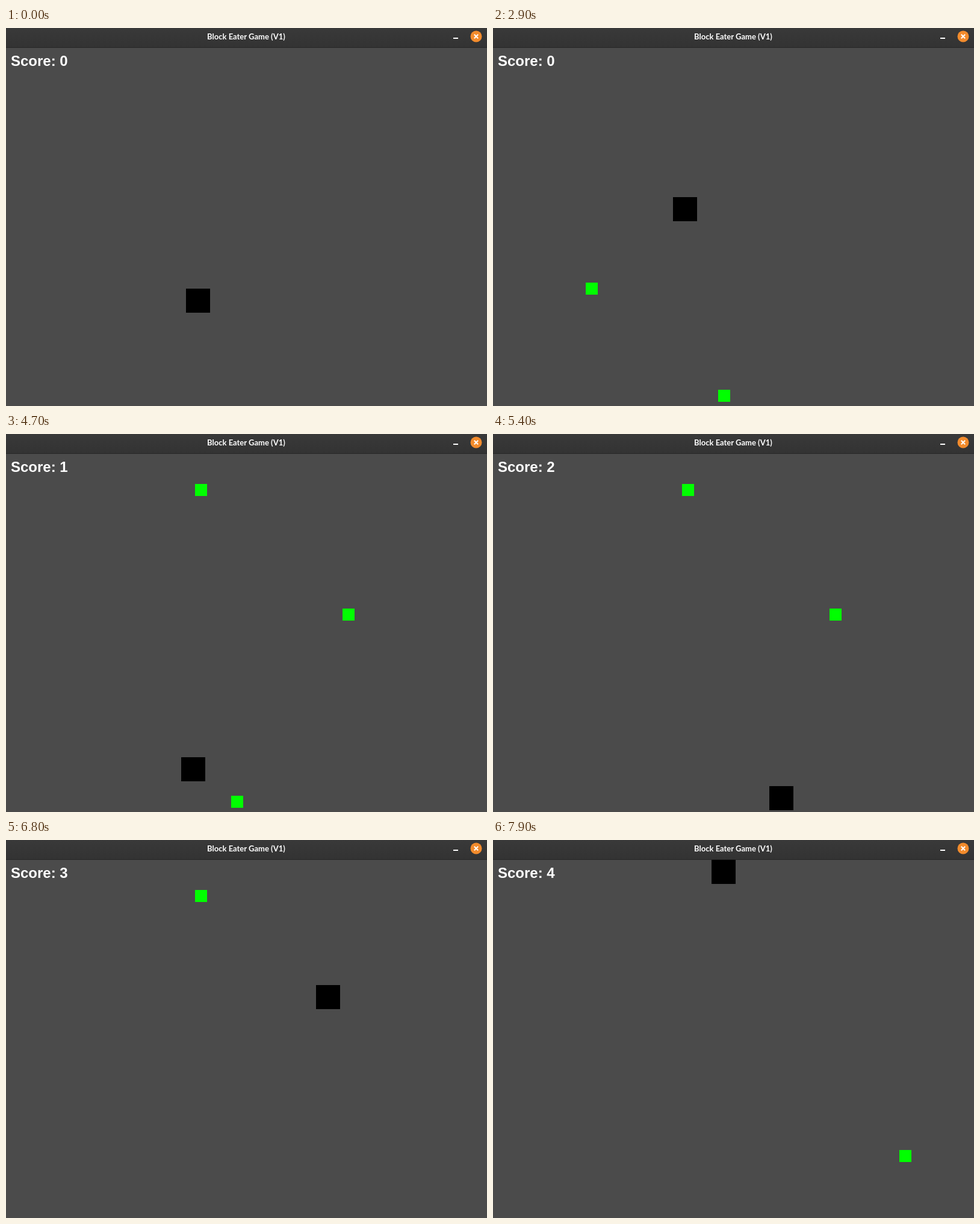
Recreate the animation shown at these times as an HTML page. Size 799 px wide and 628 px high, loop 8000 ms.

```html
<!DOCTYPE html>
<html lang="en">
<head>
<meta charset="utf-8">
<title>Block Eater Game (V1)</title>
<style>
  html, body { margin: 0; width: 100%; height: 100%; overflow: hidden; background: #4b4b4b; }
  svg { display: block; width: 799px; height: 628px; }
  .title { font: 700 13px Lato, sans-serif; text-anchor: middle; }
  .score { font: 700 24px "Liberation Sans", Arial, sans-serif; }
</style>
</head>
<body>
<svg viewBox="0 0 799 628">
  <defs>
    <linearGradient id="bar" x2="0" y2="1">
      <stop stop-color="#393939"/>
      <stop offset="1" stop-color="#333"/>
    </linearGradient>
  </defs>
  <rect width="799" height="628" fill="#4b4b4b"/>
  <g id="foods" fill="#0f0"></g>
  <rect id="player" width="40" height="40"/>
  <text id="score" class="score" x="8" y="63" fill="#fff">Score: 0</text>
  <rect width="799" height="32" fill="url(#bar)"/>
  <rect y="32" width="799" height="1" fill="#272727"/>
  <text class="title" x="399" y="19" fill="#fff">Block Eater Game (V1)</text>
  <rect x="743" y="16" width="8" height="2" fill="#fff"/>
  <circle cx="781" cy="14" r="9.5" fill="#f28b2c"/>
  <path d="M777.8 10.8l6.4 6.4m0-6.4l-6.4 6.4" stroke="#fff" stroke-width="2"/>
  <path id="pointer" d="M1 1v19l4.5-4 3 7 3.5-1.5-3-6.5h6z" stroke="#fff"/>
</svg>
<script>
const LOOP = 8000, TICK = 100, STEP = 8;
const $ = id => document.getElementById(id);

// Player path per axis: [ms, grid steps]
const pathX = [
  [3333, 0], [3600, -8], [3700, -10], [3967, -18], [4133, -18], [4700, -1],
  [5400, 20], [5540, 20], [6100, 37], [6133, 38], [6433, 38], [6800, 27],
  [7200, 15], [7667, 1], [7900, 8]
];
const pathY = [
  [300, 50], [1000, 29], [2800, 29], [2900, 31], [3333, 44], [3867, 44],
  [4500, 63], [4833, 63], [5067, 70], [5367, 70], [5400, 69], [6100, 47],
  [6300, 42], [6800, 26], [7200, 14], [7667, 0]
];
// Food: x, y, appears, eaten
const foods = [
  [154, 423, 2600, 3900],
  [374, 601, 2800, 5000],
  [559, 290, 3300, 6600],
  [314, 83, 4200, 7600],
  [675, 515, 7000, LOOP]
];
// Mouse pointer: [ms, x, y], hidden without a position
const pointer = [[0], [300, 755, 118], [400, 691, 150], [2300, 729, 54], [2400]];

function along(path, t) {
  const i = path.findIndex(p => p[0] > t);
  if (i === 0) return path[0][1];
  if (i < 0) return path[path.length - 1][1];
  const [t0, a] = path[i - 1], [t1, b] = path[i];
  return Math.round(a + (b - a) * (t - t0) / (t1 - t0));
}

function place(el, x, y) {
  el.setAttribute("transform", `translate(${x} ${y})`);
}

const show = (el, on) => el.setAttribute("visibility", on ? "visible" : "hidden");

const blocks = foods.map(([x, y]) => {
  const el = document.createElementNS("http://www.w3.org/2000/svg", "rect");
  el.setAttribute("width", 20);
  el.setAttribute("height", 20);
  place(el, x, y);
  return $("foods").appendChild(el);
});

function draw(ms) {
  const t = Math.floor(ms % LOOP / TICK) * TICK;
  place($("player"), 299 + STEP * along(pathX, t), 33 + STEP * along(pathY, t));
  foods.forEach(([, , from, to], i) => show(blocks[i], t >= from && t < to));
  $("score").textContent = "Score: " + foods.filter(f => t >= f[3]).length;
  const [, x, y] = pointer.filter(p => p[0] <= t).pop();
  show($("pointer"), x !== undefined);
  if (x !== undefined) place($("pointer"), x, y);
}

const start = performance.now();
function loop() {
  draw(performance.now() - start);
  requestAnimationFrame(loop);
}
loop();
</script>
</body>
</html>
```
